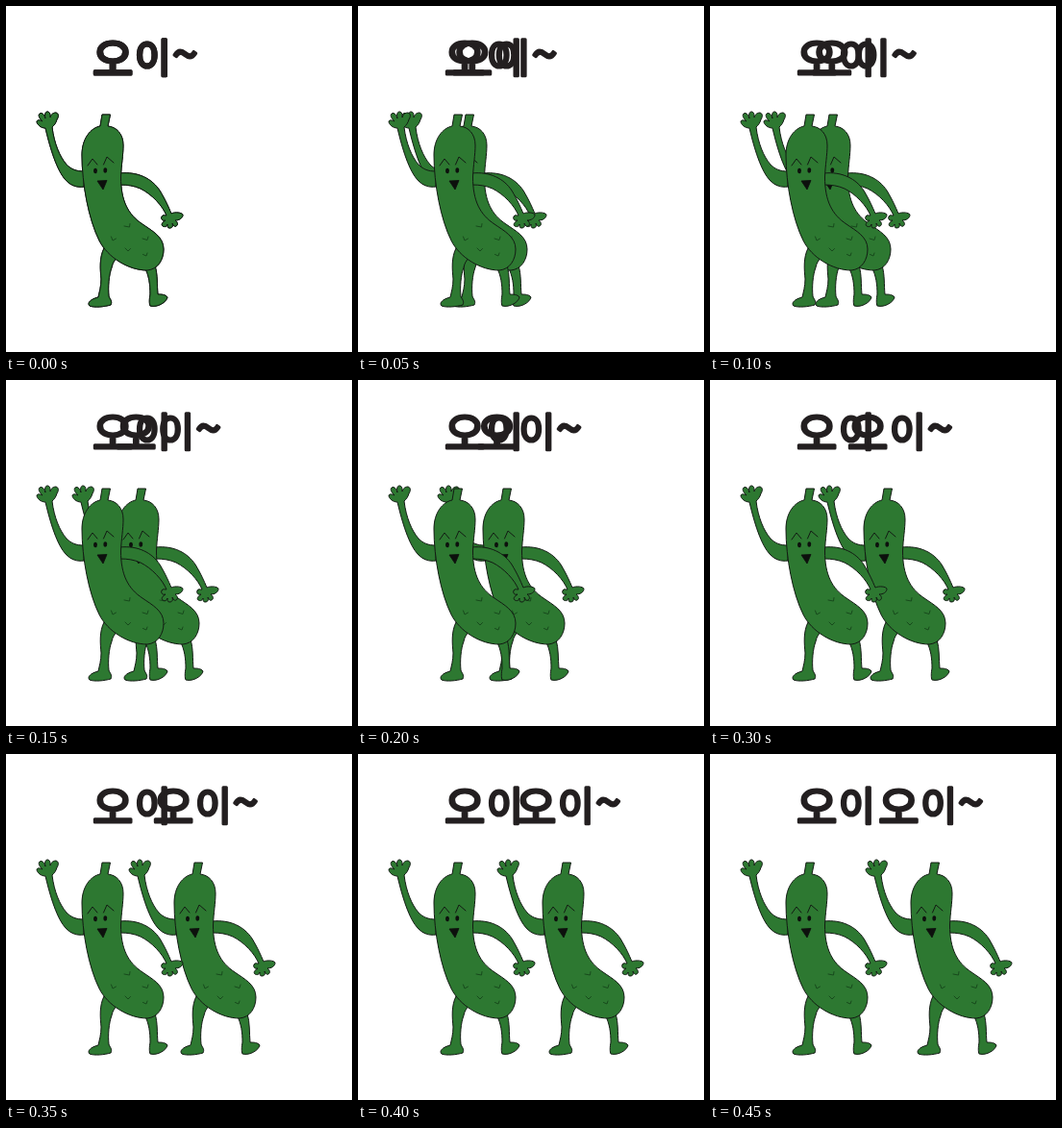
An HTML page that plays this animation: 360x360 px, repeating every 1000 ms.

```html
<!DOCTYPE html>
<html lang="ko">
<head>
<meta charset="utf-8">
<title>오이~</title>
<style>
  @property --x { syntax: "<number>"; inherits: true; initial-value: 0; }

  html, body { margin: 0; width: 100%; height: 100%; overflow: hidden; background: #fff; }
  svg { display: block; width: 100vw; height: 100vh; animation: slide 1s step-end infinite; }

  .twin { transform: translateX(calc(var(--x) * 1px)); }
  .echo { transform: translateX(calc(var(--x) * .655px)); }

  .skin { fill: #2d7831; stroke: #121a13; stroke-width: 1; stroke-linejoin: round; }
  .line { fill: none; stroke: #121a13; stroke-width: 1; stroke-linecap: round; stroke-linejoin: round; }
  .bump { stroke: #174a1c; }
  .dark { fill: #0d100d; }
  .mouth { stroke: #0d100d; stroke-width: .8; stroke-linejoin: round; }

  /* a light weight with a thick round outline gives soft stroke ends */
  text {
    font: 400 41px "Noto Sans CJK KR", "Noto Sans CJK", "Noto Sans CJK JP", sans-serif;
    fill: #231f20; stroke: #231f20; stroke-width: 3; stroke-linejoin: round;
  }
  .big { font-size: 46px; }
  .wave { font-size: 48px; text-anchor: middle; }

  @keyframes slide {
    0%   { --x: 0; }
    5%   { --x: 12; }
    10%  { --x: 24; }
    15%  { --x: 37; }
    20%  { --x: 51; }
    25%  { --x: 66; }
    30%  { --x: 81; }
    35%  { --x: 96; }
    40%  { --x: 113; }
    45%, 100% { --x: 130; }
  }
</style>
</head>
<body>
<svg viewBox="0 0 360 360">
  <defs>
    <g id="cucumber">
      <g class="skin">
        <!-- raised arm -->
        <path d="M81 188C74 189 68 187 63 182C53 172 46 148 41 127C36 127 32 123 32 120C33 118 36 119 38 120C35 117 33 114 35 112C38 110 40 114 41 117C40 113 41 110 43 110C46 110 46 113 46 116C47 112 50 111 52 111C55 112 55 115 53 118C52 122 50 124 48 126C50 143 56 157 63 165C68 170 73 172 81 172Z"/>
        <!-- lowered arm -->
        <path d="M118 174C138 172 152 180 160 192C166 202 169 209 172 216C176 214 183 215 184 217C184 221 180 223 176 223C179 225 179 228 177 229C175 230 174 228 173 226C174 229 173 231 170 231C168 231 168 229 168 227C167 230 165 230 163 229C161 227 163 225 166 223C163 224 161 222 162 219C163 217 165 218 167 218C163 208 152 196 140 190C133 187 127 186 118 186Z"/>
        <!-- legs -->
        <path d="M102 252C97 262 98 274 99 284C99 292 97 298 96 303C88 305 84 309 87 312C92 314 102 313 109 311C111 307 108 305 107 302C106 292 107 280 110 272C111 267 113 265 115 262Z"/>
        <path d="M144 271C149 281 150 290 150 300C149 305 149 310 150 312C158 314 167 308 168 303C166 300 161 300 158 300C157 290 158 280 155 270Z"/>
        <!-- body and stalk -->
        <path d="M98 125C88 127 79 138 79 155C79 185 86 222 97 244C106 262 128 275 147 275C158 274 164 264 164 253C164 240 152 234 142 227C127 217 119.500 203 119.500 178C120 165 122 155 122 145C122 133 115 126 106 125L108.500 113H100Z"/>
      </g>
      <path class="line" d="M85 166L90 159L95 165M101.500 165L105 157L112 163"/>
      <ellipse class="dark" cx="93" cy="171.500" rx="1.900" ry="2.800"/>
      <ellipse class="dark" cx="103.300" cy="171" rx="1.900" ry="2.800"/>
      <path class="dark mouth" d="M95 182L105 181.500L101 191Z"/>
      <path class="line bump" d="M123 229L128.500 230L129 226.500M109.500 240L111 244L114.500 242M142 242L147 243.500L148 240M124 252L127 255L129.500 252.500M142.500 258.500L146 260L147 257"/>
    </g>
    <g id="word">
      <text><tspan class="big" x="90" y="71.500">오</tspan><tspan x="134" y="68.500">이</tspan></text>
    </g>
  </defs>

  <g class="echo">
    <use href="#word"/>
    <text class="wave" x="186.300" y="68">~</text>
  </g>
  <use href="#word"/>

  <use class="twin" href="#cucumber"/>
  <use href="#cucumber"/>
</svg>
</body>
</html>
```
